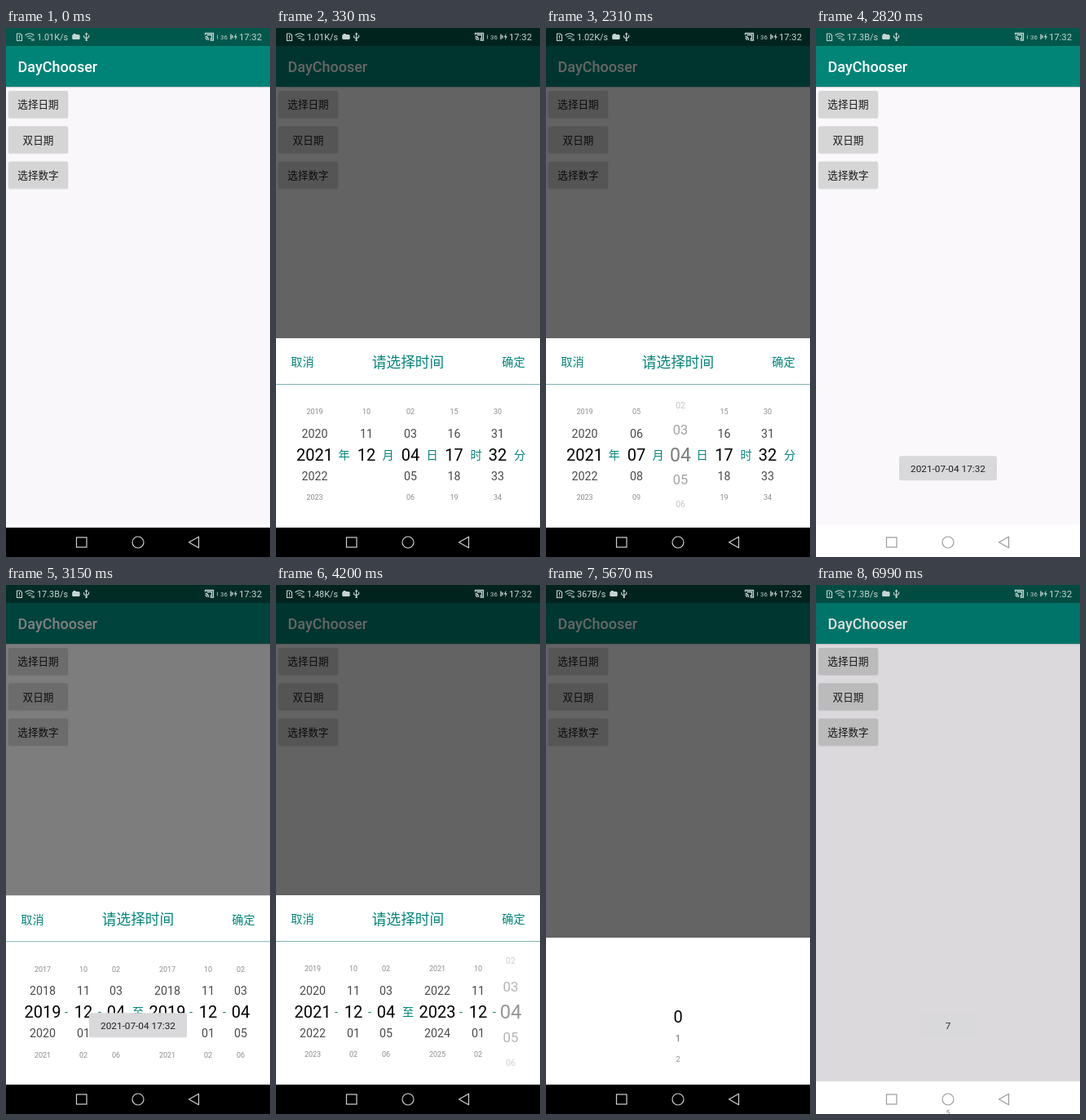
Write an HTML page that moves like this. It is 324 px wide and 648 px high and loops after 7020 ms.

```html
<!DOCTYPE html>
<html lang="zh-CN">
<head>
<meta charset="utf-8">
<style>
html, body { margin: 0; width: 100%; height: 100%; overflow: hidden; background: #fff; }
svg { display: block; width: 324px; height: 648px; }
text { font-family: Roboto, "Noto Sans CJK SC", "Noto Sans CJK", sans-serif; white-space: pre; }
</style>
</head>
<body>
<svg id="stage" viewBox="0 0 324 648" xmlns="http://www.w3.org/2000/svg"></svg>
<script>
const LOOP = 7020, SLIDE = 110, ROW = 26.2, CENTER = 522.7;
const TEAL = '#00857a', STATUS = '#c4d5d2';
const stage = document.getElementById('stage');

function add(parent, tag, attrs = {}, content) {
  const node = document.createElementNS('http://www.w3.org/2000/svg', tag);
  set(node, attrs);
  if (content !== undefined) node.textContent = content;
  parent.appendChild(node);
  return node;
}
function set(node, attrs) {
  for (const key in attrs) node.setAttribute(key, attrs[key]);
}
const rect = (parent, x, y, width, height, fill, more = {}) =>
  add(parent, 'rect', { x, y, width, height, fill, ...more });
// Text centred vertically on y
const label = (parent, x, y, size, fill, content, more = {}) =>
  add(parent, 'text', { x, y: y + size * .36, 'font-size': size, fill, 'text-anchor': 'middle', ...more }, content);
const show = (node, visible) => node.setAttribute('display', visible ? 'inline' : 'none');
const clamp = x => Math.max(0, Math.min(1, x));
const smooth = x => { x = clamp(x); return x * x * (3 - 2 * x); };

// Moves: [from time, to time, new value]
function track(t, value, moves = []) {
  for (const [from, to, target] of moves) value += (target - value) * smooth((t - from) / (to - from));
  return value;
}

// Page
rect(stage, 0, 0, 324, 648, '#faf8fb');
rect(stage, 0, 72, 324, 1.2, '#d5d5d8');
rect(stage, 0, 22, 324, 50, '#008577');
rect(stage, 0, 0, 324, 22, '#00574b');
label(stage, 14.5, 47.5, 18, '#fff', 'DayChooser', { 'text-anchor': 'start', 'font-weight': 500 });
['选择日期', '双日期', '选择数字'].forEach((name, i) => {
  const y = 77 + i * 43.3;
  rect(stage, 2.5, y + .5, 74, 33.5, '#000', { rx: 2.5, opacity: .1 });
  rect(stage, 3, y, 73, 33, '#d6d6d7', { rx: 2 });
  label(stage, 39.5, y + 16.8, 12.6, '#1b1b1b', name);
});

const dim = rect(stage, 0, 0, 324, 608, '#000');
rect(stage, 0, 608, 324, 40, '#fff');

// Status bar, not covered by the dimming
const line = { fill: 'none', stroke: STATUS, 'stroke-width': 1.1 };
const path = (parent, d, more = {}) => add(parent, 'path', { d, ...line, ...more });
path(stage, 'M13.5 7h4l2 2v6.500h-6zM16.500 9v3M16.500 13.100v1');
path(stage, 'M23.500 9q5.500-4.500 11 0M25.500 11.200q3.500-3 7 0M27.300 13.200q1.700-1.500 3.400 0M32 13v3M34 16v-3');
const speed = label(stage, 38, 11, 10.9, STATUS, '', { 'text-anchor': 'start' });
const badges = add(stage, 'g');
rect(badges, 5, 8, 9.5, 6, STATUS, { rx: 1.5 });
rect(badges, 6.5, 7, 3, 2, STATUS);
path(badges, 'M22.500 6.500v9M19.500 9v2.500l3 1.500 3-2v-2.500M21.300 8l1.200-1.800 1.200 1.800');
add(badges, 'circle', { cx: 22.5, cy: 14.8, r: 1.2, fill: STATUS });
path(stage, 'M244.500 8.500v-2h10v8.500h-4M244.500 10.500q4 0 4 4.500M244.500 12.700q2 0 2 2M246.500 8.500h6v4.500h-2', { 'stroke-width': 1.3 });
path(stage, 'M259.500 8.500v5', { opacity: .7 });
label(stage, 267.5, 11.2, 7.8, STATUS, '36');
path(stage, 'M276 7.500v6.500M278 9v3.500', { 'stroke-width': 1.4 });
add(stage, 'path', { d: 'M282.500 6.500l-2.700 4.800h1.800l-.6 3.700 2.800-4.800h-1.800z', fill: STATUS });
label(stage, 300, 11, 11.3, STATUS, '17:32');

// Bottom sheets
const two = n => String(n).padStart(2, '0');
const year = n => String(n);
const upTo12 = n => n > 12 ? null : two(n);
const cyclic12 = n => two((n + 11) % 12 + 1);
const digit = n => n < 0 || n > 9 ? null : String(n);

const sheets = [
  {
    open: 0, close: 2640, top: 380,
    units: [[83.5, '年'], [137.5, '月'], [191.5, '日'], [245.5, '时'], [299, '分']],
    wheels: [
      { x: 47.5, format: year, start: 2021, moves: [[420, 720, 2024], [840, 1240, 2021]] },
      { x: 111, format: upTo12, start: 12, moves: [[1420, 1720, 9], [1860, 2240, 7]] },
      { x: 165, format: two, start: 4, resets: [2260] },
      { x: 218.5, format: two, start: 17 },
      { x: 272, format: two, start: 32 }
    ]
  },
  {
    open: 3060, close: 4830, top: 380,
    units: [[74, '-'], [115, '-'], [162, '至'], [227, '-'], [268, '-']],
    wheels: [
      { x: 45, format: year, start: 2019, moves: [[3400, 3720, 2021]] },
      { x: 95, format: cyclic12, start: 12 },
      { x: 135, format: two, start: 4, resets: [3740] },
      { x: 198, format: year, start: 2019, moves: [[3860, 4140, 2023], [4240, 4560, 2025]] },
      { x: 248, format: cyclic12, start: 12 },
      { x: 288, format: two, start: 4, resets: [4160, 4580] }
    ]
  },
  {
    open: 5562, close: 6904, top: 432, units: [],
    wheels: [
      { x: 162, format: digit, start: 0,
        moves: [[5600, 5670, -.23], [5680, 5760, 0], [5830, 6130, 3], [6230, 6620, 7]] }
    ]
  }
];

rect(add(stage, 'clipPath', { id: 'wheelArea' }), 0, 451, 324, 143.5, '#000');

for (const sheet of sheets) {
  const group = sheet.group = add(stage, 'g');
  rect(group, 0, sheet.top, 324, 400, '#fff');
  if (sheet.units.length) {
    label(group, 32.5, 409.3, 14.2, TEAL, '取消');
    label(group, 162, 409.8, 17.7, TEAL, '请选择时间');
    label(group, 291.5, 409.3, 14.2, TEAL, '确定');
    rect(group, 0, 436, 324, 1, '#7db5b5');
  }
  for (const [x, name] of sheet.units) label(group, x, CENTER, 14.2, TEAL, name);
  const area = add(group, 'g', { 'clip-path': 'url(#wheelArea)' });
  for (const wheel of sheet.wheels) {
    wheel.group = add(area, 'g');
    wheel.rows = Array.from({ length: 7 }, () => label(wheel.group, wheel.x, 0, 9, '#000', ''));
  }
}

function drawWheel(wheel, t) {
  const position = track(t, wheel.start, wheel.moves), nearest = Math.round(position);
  wheel.rows.forEach((row, i) => {
    const value = nearest + i - 3, offset = value - position, distance = Math.abs(offset);
    const content = distance < 2.85 ? wheel.format(value) : null;
    show(row, content !== null);
    if (content === null) return;
    const near = clamp((1.45 - distance) / .95), size = 9 + 11 * near;
    const gray = Math.round(140 * (1 - near));
    row.textContent = content;
    set(row, { y: CENTER + offset * ROW + size * .355, 'font-size': size, fill: `rgb(${gray},${gray},${gray})` });
  });
  // A refreshed column fades in while shrinking to its size
  const reset = (wheel.resets || []).find(r => t >= r && t < r + 100);
  const p = reset === undefined ? 1 : (t - reset) / 100;
  const scale = 1 + .32 * (1 - p);
  set(wheel.group, {
    opacity: p,
    transform: `translate(${wheel.x} ${CENTER}) scale(${scale}) translate(${-wheel.x} ${-CENTER})`
  });
}

// Navigation bar
const navDark = rect(stage, 0, 612, 324, 36, '#000');
const navIcons = add(stage, 'g', { fill: 'none', 'stroke-width': 1.2 });
add(navIcons, 'rect', { x: 86.5, y: 624, width: 12.5, height: 12 });
add(navIcons, 'circle', { cx: 162, cy: 630, r: 7 });
add(navIcons, 'path', { d: 'M224.500 630l12-6.800v13.600z', 'stroke-linejoin': 'round' });

// Toasts
const toasts = [
  { from: 2650, to: 3270, width: 120, content: '2021-07-04 17:32' },
  { from: 4827, to: 5430, width: 154, content: '2021-12-04  2025-12-04' },
  { from: 6890, to: 7500, width: 69, content: '7' }
];
for (const toast of toasts) {
  toast.group = add(stage, 'g');
  rect(toast.group, 162 - toast.width / 2, 524.3, toast.width, 30, '#d9d8da', { rx: 2.5 });
  label(toast.group, 162, 540, 11.8, '#202020', toast.content);
}

const speeds = [[0, '1.01K/s'], [810, '2.25K/s'], [1620, '1.02K/s'], [2700, '17.3B/s'],
  [3900, '1.48K/s'], [5100, '367B/s'], [6100, '17.3B/s']];

function render(t) {
  let shade = 0, dark = false;
  for (const sheet of sheets) {
    const active = t >= sheet.open && t < sheet.close + SLIDE;
    show(sheet.group, active);
    if (!active) continue;
    const enter = clamp((t - sheet.open) / SLIDE), leave = clamp((t - sheet.close) / SLIDE);
    const hidden = Math.max(Math.pow(1 - enter, 4), Math.pow(leave, .85));
    shade = .6 * enter * (1 - leave);
    dark = t < sheet.close;
    sheet.group.setAttribute('transform', `translate(0 ${hidden * (648 - sheet.top)})`);
    for (const wheel of sheet.wheels) drawWheel(wheel, t);
  }
  dim.setAttribute('opacity', shade);
  show(navDark, dark);
  navIcons.setAttribute('stroke', dark ? '#d0d0d0' : '#9a9a9a');

  for (const { group, from, to } of toasts)
    group.setAttribute('opacity', Math.min(clamp((t - from) / SLIDE), clamp((to - t) / SLIDE)));

  const current = speeds.filter(([at]) => t >= at).pop()[1];
  if (speed.textContent !== current) speed.textContent = current;
  badges.setAttribute('transform', `translate(${38 + speed.getComputedTextLength()} 0)`);
}

function tick() {
  render(performance.now() % LOOP);
  requestAnimationFrame(tick);
}
tick();
</script>
</body>
</html>
```
